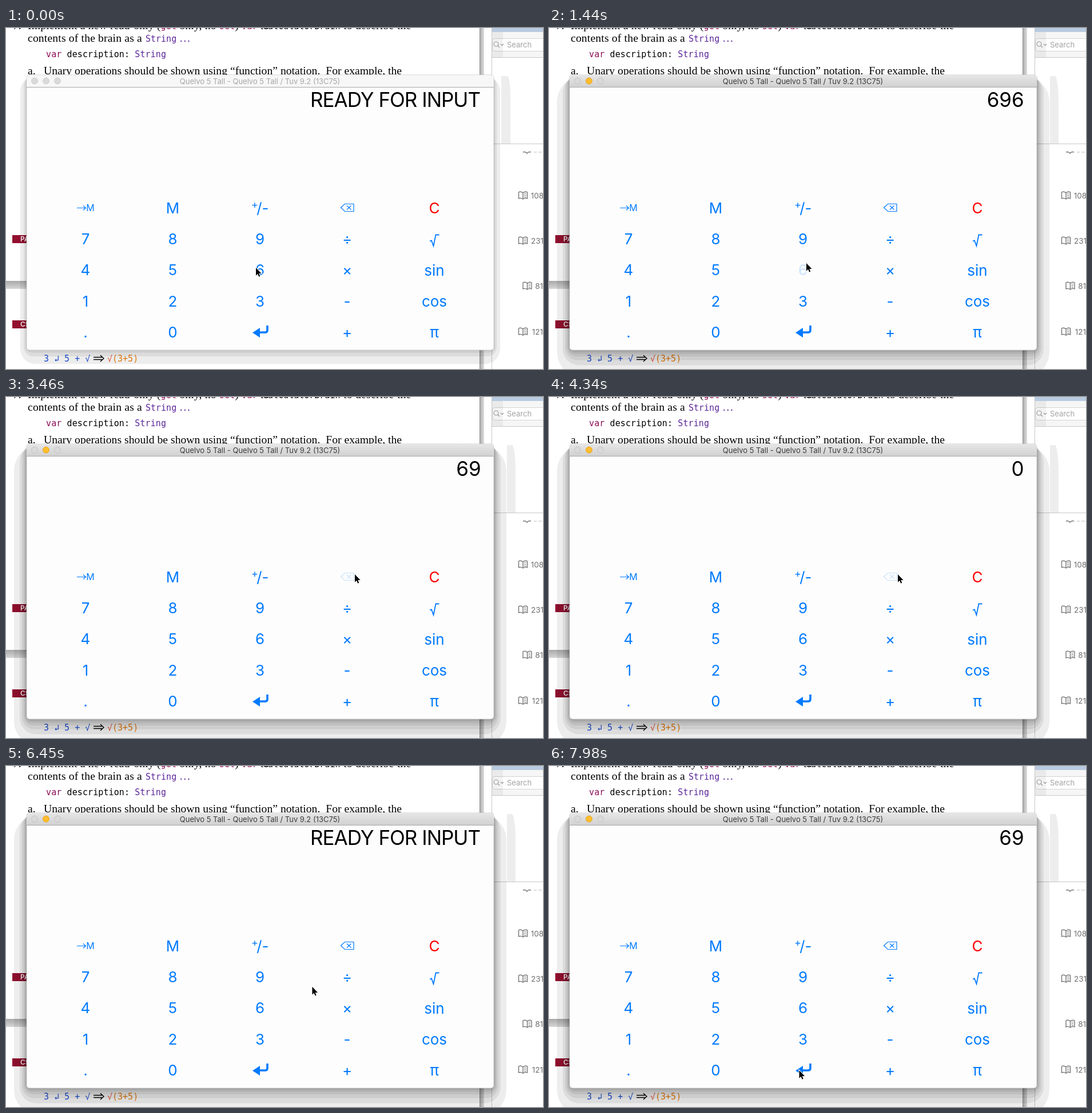
An HTML page that plays this animation: 939 px wide and 596 px high, repeating every 8000 ms.

```html
<!DOCTYPE html>
<html lang="en">
<head>
<meta charset="utf-8">
<title>Calculator</title>
<style>
  html, body { margin: 0; width: 100%; height: 100%; overflow: hidden; background: #fff; }
  svg { display: block; width: 939px; height: 596px; font-family: Inter, Roboto, sans-serif; }
  .serif { font: 19.7px "Liberation Serif", serif; }
  .mono { font: 15px "DejaVu Sans Mono", monospace; }
  .kw { fill: #8c0c55; }
  .type { fill: #5c2699; }
  .mid { text-anchor: middle; }
  .shade > * { fill: #000; opacity: .07; }
  .on .idle, svg:not(.on) .active { display: none; }
  #keys { font-size: 26px; fill: #007aff; text-anchor: middle; }
  .line { fill: none; stroke: #007aff; }
  .count { font-size: 13.5px; fill: #707070; text-anchor: end; }
</style>
</head>
<body>
<svg id="stage" viewBox="0 0 939 596">
  <defs>
    <linearGradient id="bar" x2="0" y2="1"><stop stop-color="#e6e6e6"/><stop offset="1" stop-color="#d1d1d1"/></linearGradient>
    <linearGradient id="gapX"><stop stop-color="#a9a9a9"/><stop offset="1" stop-color="#dedede"/></linearGradient>
    <linearGradient id="gapY" x2="0" y2="1"><stop stop-color="#a9a9a9"/><stop offset="1" stop-color="#d6d6d6"/></linearGradient>
    <g id="book" fill="#fff" stroke="#6c6c6c" stroke-width="1.3">
      <path d="M0 -5Q-4 -8 -7.500 -6V5Q-4 3.500 0 6Q4 3.500 7.500 5V-6Q4 -8 0 -5V6"/>
      <path d="M2 -3L5.500 -4M2 0L5.500 -1M2 3L5.500 2" stroke-width=".9"/>
    </g>
  </defs>

  <!-- document behind -->
  <g class="serif">
    <text x="12" y="2">7.</text>
    <text x="38" y="2" letter-spacing=".15">Implement a new read-only (<tspan class="mono kw">get</tspan> only, no <tspan class="mono kw">set</tspan>) <tspan class="mono kw">var</tspan> to</text>
    <text class="mono" x="449" y="2">CalculatorBrain</text>
    <text x="590" y="2" letter-spacing=".25">to describe the</text>
    <text x="38" y="24" letter-spacing=".14">contents of the brain as a</text>
    <text class="mono type" x="244" y="24">String</text>
    <text class="type" x="303" y="24">…</text>
    <text x="38" y="81">a.</text>
    <text x="66" y="81">Unary operations should be shown using “function” notation.&#160; For example, the</text>
  </g>
  <text class="mono" x="70" y="51" letter-spacing=".1"><tspan class="kw">var</tspan> description: <tspan class="type">String</tspan></text>
  <g class="mono">
    <text x="66" y="583" fill="#1d50dc">3 ↲ 5 + √</text>
    <text x="177" y="583" fill="#ee7f0c"><tspan fill="#f0553c">√</tspan>(3+5)</text>
    <path d="M153 575.500H168M153 579.500H168M165 572L171 577.500L165 583" fill="none" stroke="#000" stroke-width="1.400"/>
  </g>
  <path d="M0 442H36V456H0Z" fill="url(#gapY)"/>
  <g fill="#92102f"><path d="M11 362H37V376H11Z"/><path d="M11 511H37V525H11Z"/></g>
  <g font-size="12" font-weight="600" fill="#fff"><text x="25" y="373">PA</text><text x="25" y="522">CS</text></g>
  <path d="M828 0H836V596H828Z" fill="url(#gapX)"/>
  <path d="M828.500 0V596" stroke="#8f8f8f"/>

  <!-- side window -->
  <path d="M849 0H939V596H849Z" fill="#fff"/>
  <path d="M849 0H939V7H849Z" fill="#b9cbe0"/>
  <path d="M849 7H939V51H849Z" fill="#f6f6f6"/>
  <rect x="850.500" y="18.500" width="110" height="22" rx="4" fill="#fff" stroke="#d4d4d4"/>
  <path d="M849 7H869V51H849Z" opacity=".05"/>
  <g fill="none" stroke="#999" stroke-width="1.200"><circle cx="857" cy="28" r="4"/><path d="M860 31L863 34M865 28L867.500 30.500L870 28"/></g>
  <text x="876" y="34" font-size="13" fill="#a3a3a3">Search</text>
  <path d="M849.500 0V596M849 51.500H939M849 202.500H939" stroke="#c8c8c8"/>
  <path d="M904 217Q908 215.500 911 219Q914 215.500 918 217" fill="none" stroke="#777" stroke-width="1.600"/>
  <path d="M923 217H928M931 217H937" stroke="#bbb"/>
  <use href="#book" x="904" y="293"/><use href="#book" x="904" y="372"/>
  <use href="#book" x="911.500" y="451"/><use href="#book" x="904" y="531"/>
  <g class="count"><text x="940" y="298">108</text><text x="940" y="377">231</text><text x="939" y="456">81</text><text x="939" y="536">121</text></g>

  <!-- banded window shadow -->
  <g id="dimShade" class="shade idle"><path d="M866 84H878Q882 95 882 120V202H866Z"/></g>
  <g id="fullShade" class="shade active"><path d="M876 84H886Q891 98 891 130V202H876Z"/></g>

  <!-- calculator window -->
  <rect x="36" y="82" width="817" height="481" rx="5" fill="#fdfdfd" stroke="#b8b8b8" stroke-width=".7"/>
  <path id="titleBar" d="M36.500 103V87Q36.500 82.500 41 82.500H848Q852.500 82.500 852.500 87V103Z"/>
  <path d="M36 103.500H853" stroke="#a9a9a9"/>
  <g class="idle" fill="#dadada" stroke="#cecece"><circle cx="50" cy="92.500" r="5.500"/><circle cx="70" cy="92.500" r="5.500"/><circle cx="90" cy="92.500" r="5.500"/></g>
  <g class="active" fill="#d9d9d9" stroke="#c4c4c4"><circle cx="50" cy="92.500" r="5.500"/><circle cx="70" cy="92.500" r="5.500" fill="#fdbd2e" stroke="#e3a42a"/><circle cx="90" cy="92.500" r="5.500"/></g>
  <text id="title" class="mid" x="444" y="97.500" font-size="13">Quelvo 5 Tall - Quelvo 5 Tall / Tuv 9.2 (13C75)</text>
  <text id="display" y="138" font-size="35" text-anchor="end"></text>

  <g id="keys">
    <text x="147.500" y="319.500" font-size="16">M</text>
    <path class="line" d="M124 314.500H139M135 310.500L139.500 314.500L135 318.500" stroke-width="1.200"/>
    <text x="435" y="315" font-size="18">+</text><text x="443" y="324">/</text><text x="453.500" y="324">-</text>
    <g id="erase"><path class="line" d="M585.500 314L592.500 307.500H608V320.500H592.500ZM596 310.500L603.500 317.500M603.500 310.500L596 317.500" stroke-width="1.200"/></g>
    <path class="line" d="M741 372.500L744 371.500L747.500 381L751.500 361.500H757.500" stroke-width="1.800"/>
    <path class="line" d="M457 520V528Q457 532 453 532H440" stroke-width="3.600"/>
    <path d="M431 532.500L444 524V541Z"/>
  </g>
  <path id="cursor" d="M0 0V13.700L3.100 10.800L5.200 15.700L7.200 14.800L5.300 10.100H9.600Z" stroke="#fff" stroke-width="2" paint-order="stroke"/>
</svg>
<script>
const el = id => document.getElementById(id);
const keys = { erase: el('erase') };

function add(parent, tag, attrs) {
  const node = document.createElementNS('http://www.w3.org/2000/svg', tag);
  for (const name in attrs) node.setAttribute(name, attrs[name]);
  el(parent).append(node);
  return node;
}

// nested bands, each reaching further below the window than beside it
function addShade(id, spreads) {
  for (const d of spreads)
    add(id, 'rect', { x: 36 - d, y: 84, width: 817 + 2 * d, height: 479 + 2.2 * d, rx: 8 + 1.7 * d });
}
addShade('dimShade', [11, 5, 2]);
addShade('fullShade', [22, 12, 8, 5, 3, 1.5]);

// label, column centre, baseline
function addKey(label, x, y, fill = '#007aff') {
  keys[label] = add('keys', 'text', { x, y, fill });
  keys[label].textContent = label;
}
const cols = [139, 291.5, 444, 596.5, 749];
['789÷', '456×', '123-', '.0 +'].forEach((row, r) =>
  [...row].forEach((c, i) => c !== ' ' && addKey(c, cols[i], 378 + r * 54.3)));
addKey('M', cols[1], 323.5);
addKey('C', cols[4], 324, '#f00');
addKey('sin', cols[4], 433);
addKey('cos', cols[4], 487);
addKey('π', cols[4], 541);

const READY = 'READY FOR INPUT';
// time, key, display afterwards
const presses = [
  [770, '6', '6'], [1095, '9', '69'], [1440, '6', '696'], [1790, '9', '6969'],
  [2930, 'erase', '696'], [3460, 'erase', '69'], [3900, 'erase', '6'],
  [4340, 'erase', '0'], [4870, 'erase', READY], [6800, '6', '6'], [7325, '9', '69']
];
// time, pointer x, y
const path = [
  [0, 437, 419], [920, 437, 419], [1095, 447, 381], [1183, 447, 381],
  [1440, 450, 411], [1540, 450, 411], [1720, 448, 382], [1890, 448, 382],
  [2410, 620, 309], [2500, 620, 309], [2750, 610, 310], [5400, 610, 310],
  [5485, 646, 315], [5665, 733, 325], [5850, 733, 325], [6710, 450.5, 412],
  [6900, 450.5, 412], [7240, 447, 380], [7629, 447, 380], [7630, 473, 466],
  [7709, 473, 466], [7710, 437, 556], [7889, 437, 556], [7890, 437, 545],
  [7979, 437, 545], [7980, 437.5, 532], [8000, 437.5, 532]
];
const clamp = v => Math.max(0, Math.min(1, v));

// the screen refreshes about every 88 ms
function snap(t) {
  if (t < 920) return t < 770 ? 0 : 770;
  return t < 7600 ? 920 + 87.8 * Math.floor((t - 900) / 87.8) : t;
}

function draw(t) {
  const s = snap(t), on = t >= 620;
  el('stage').classList.toggle('on', on);
  el('titleBar').setAttribute('fill', on ? 'url(#bar)' : '#f7f7f7');
  el('title').setAttribute('fill', on ? '#3a3a3a' : '#a6a6a6');

  let shown = READY;
  for (const k of ['6', '9', 'erase']) keys[k].setAttribute('opacity', 1);
  for (const [at, key, text] of presses) {
    if (s < at) break;
    shown = text;
    keys[key].setAttribute('opacity', 0.2 + 0.8 * clamp((s - at - 60) / 290));
  }
  const words = shown === READY;
  const display = el('display');
  display.textContent = shown;
  display.setAttribute('x', words ? 829 : 830.5);
  display.setAttribute('letter-spacing', words ? -1 : -0.1);

  const i = Math.max(1, path.findIndex(p => p[0] > s));
  const [t0, x0, y0] = path[i - 1], [t1, x1, y1] = path[i];
  const u = clamp((s - t0) / (t1 - t0));
  el('cursor').setAttribute('transform', `translate(${x0 + (x1 - x0) * u} ${y0 + (y1 - y0) * u})`);
}

function tick() {
  draw(performance.now() % 8000);
  requestAnimationFrame(tick);
}
tick();
</script>
</body>
</html>
```
